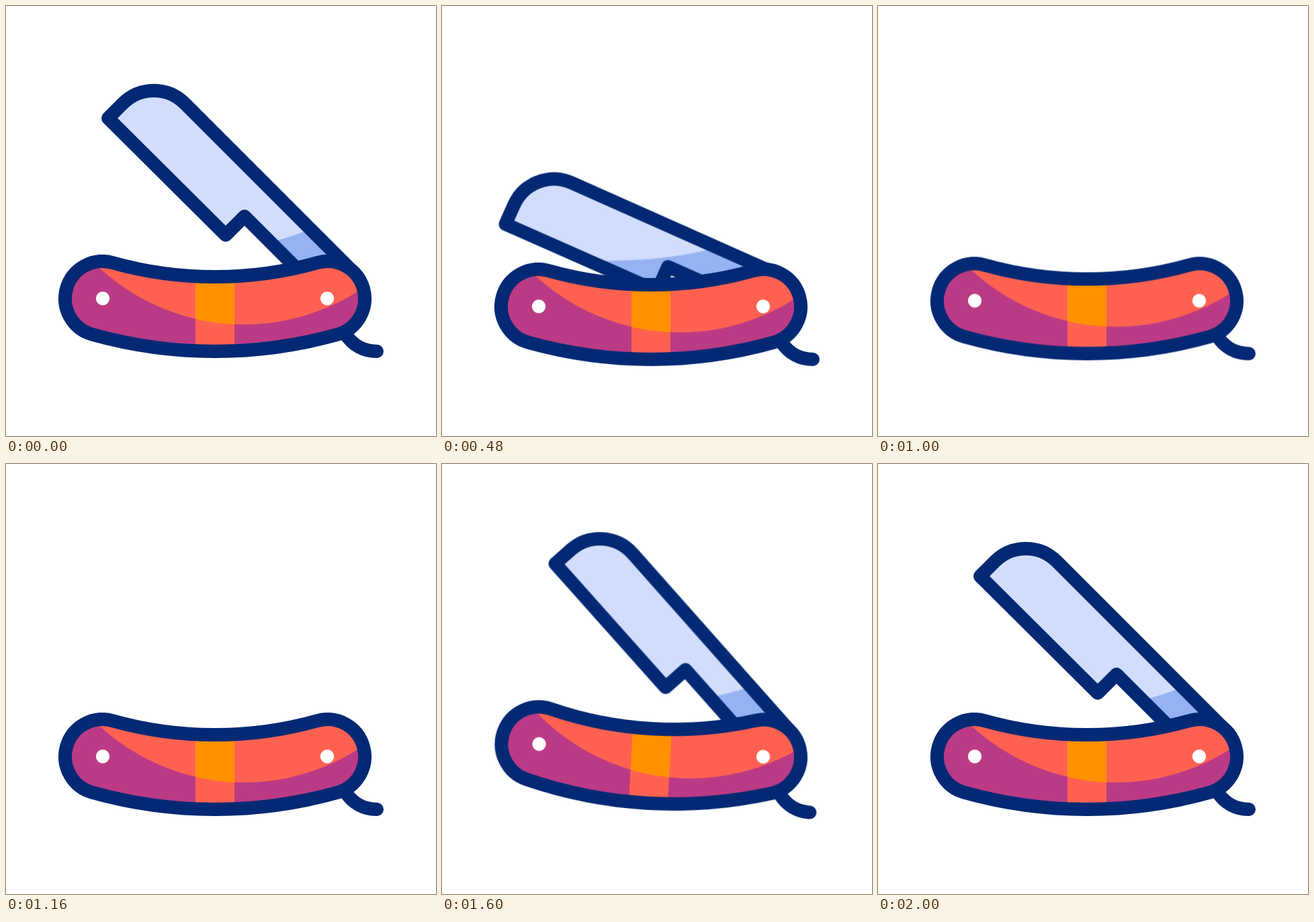
Recreate the animation shown at these times as an HTML page without scripts. Size 640 px wide and 640 px high, loop 2.04 s.

```html
<!DOCTYPE html>
<html lang="en">
<head>
<meta charset="utf-8">
<title>Folding razor</title>
<style>
html, body { margin: 0; width: 100%; height: 100%; overflow: hidden; background: #fff; }
svg { display: block; width: 100vw; height: 100vh; }

.shift, .tilt, .swing { animation: 2040ms linear infinite; }
.shift { animation-name: shift; }
.tilt { animation-name: tilt; transform-origin: 478.5px 435.5px; }
.swing { --d: 1deg; animation-name: swing; transform-origin: 516px 395px; }
/* cancels the blade's turn so the shadow stays with the handle */
.back { --d: -1deg; }

.line { fill: none; stroke: #032974; stroke-width: 20; stroke-linecap: round; stroke-linejoin: round; }

@keyframes shift {
  0%, 1.96% { transform: translate(0, 0); animation-timing-function: cubic-bezier(.5, 0, .75, .5); }
  15.69% { transform: translate(0, 5px); animation-timing-function: cubic-bezier(.35, .3, .6, 1); }
  31.37% { transform: translate(0, 15.7px); animation-timing-function: cubic-bezier(.37, 0, .63, 1); }
  56.86%, 62.75% { transform: translate(0, 0); animation-timing-function: cubic-bezier(.4, 0, .7, .7); }
  68.63% { transform: translate(0, -8px); animation-timing-function: ease-out; }
  71.57% { transform: translate(0, -9.5px); animation-timing-function: cubic-bezier(.4, 0, .6, 1); }
  78.43% { transform: translate(0, .5px); animation-timing-function: cubic-bezier(.37, 0, .5, 1); }
  92.16% { transform: translate(-16px, 0); animation-timing-function: cubic-bezier(.37, 0, .63, 1); }
  98.04%, 100% { transform: translate(0, 0); }
}
@keyframes tilt {
  0%, 62.75% { transform: rotate(0deg); animation-timing-function: cubic-bezier(.4, 0, .7, .7); }
  68.63% { transform: rotate(2.5deg); animation-timing-function: ease-out; }
  73.53% { transform: rotate(3.8deg); animation-timing-function: ease-in; }
  78.43% { transform: rotate(3.26deg); animation-timing-function: cubic-bezier(.3, .3, .6, 1); }
  92.16% { transform: rotate(1deg); animation-timing-function: ease-in-out; }
  98.04%, 100% { transform: rotate(0deg); }
}
@keyframes swing {
  0%, 1.96% { transform: rotate(0deg); animation-timing-function: cubic-bezier(.5, 0, .8, .6); }
  15.69% { transform: rotate(calc(var(--d) * -6.9)); animation-timing-function: cubic-bezier(.4, .2, .7, .8); }
  33.33% { transform: rotate(calc(var(--d) * -43)); animation-timing-function: cubic-bezier(.3, .4, .6, 1); }
  37.25%, 62.75% { transform: rotate(calc(var(--d) * -48)); animation-timing-function: cubic-bezier(.5, 0, .8, .55); }
  68.63% { transform: rotate(calc(var(--d) * -38.1)); animation-timing-function: cubic-bezier(.35, .27, .65, .7); }
  78.43% { transform: rotate(0deg); animation-timing-function: cubic-bezier(.25, .5, .6, 1); }
  92.16% { transform: rotate(calc(var(--d) * 23.4)); animation-timing-function: cubic-bezier(.37, 0, .63, 1); }
  98.04%, 100% { transform: rotate(0deg); }
}
</style>
</head>
<body>
<svg viewBox="0 0 640 640">
  <defs>
    <path id="blade" d="M152 167L174 145A65 65 0 0 1 266 145L512 391L478 436L355 313L327 341Z"/>
    <path id="body" d="M158.5 382.1A565 565 0 0 0 463.5 382.1A55.4 55.4 0 0 1 493.5 488.9A676 676 0 0 1 128.5 488.9A55.4 55.4 0 0 1 158.5 382.1Z"/>
    <clipPath id="inBlade"><use href="#blade"/></clipPath>
    <clipPath id="inBody"><use href="#body"/></clipPath>
    <clipPath id="inBand"><rect x="282" y="380" width="58" height="150"/></clipPath>
    <clipPath id="above"><rect x="-200" y="-300" width="1000" height="740"/></clipPath>
  </defs>
  <g class="shift"><g class="tilt">
    <g clip-path="url(#above)">
      <g class="swing">
        <use href="#blade" fill="#d2ddfd"/>
        <g clip-path="url(#inBlade)">
          <path class="swing back" fill="#95b2f3" d="M40 366L180 367C290 370 370 364 443 336L540 292V480H40Z"/>
        </g>
        <use href="#blade" class="line"/>
      </g>
    </g>
    <path class="line" d="M505 488C516 505 533 514 552 514"/>
    <g clip-path="url(#inBody)">
      <use href="#body" fill="#bb3a85"/>
      <circle cx="354.2" cy="157" r="317" fill="#ff6151"/>
      <g clip-path="url(#inBand)">
        <rect x="282" y="380" width="58" height="150" fill="#ff6151"/>
        <circle cx="354.2" cy="157" r="317" fill="#ff9100"/>
      </g>
    </g>
    <use href="#body" class="line"/>
    <g fill="#fff">
      <circle cx="144" cy="435.2" r="10.2"/>
      <circle cx="478" cy="435.2" r="10.2"/>
    </g>
  </g></g>
</svg>
</body>
</html>
```
